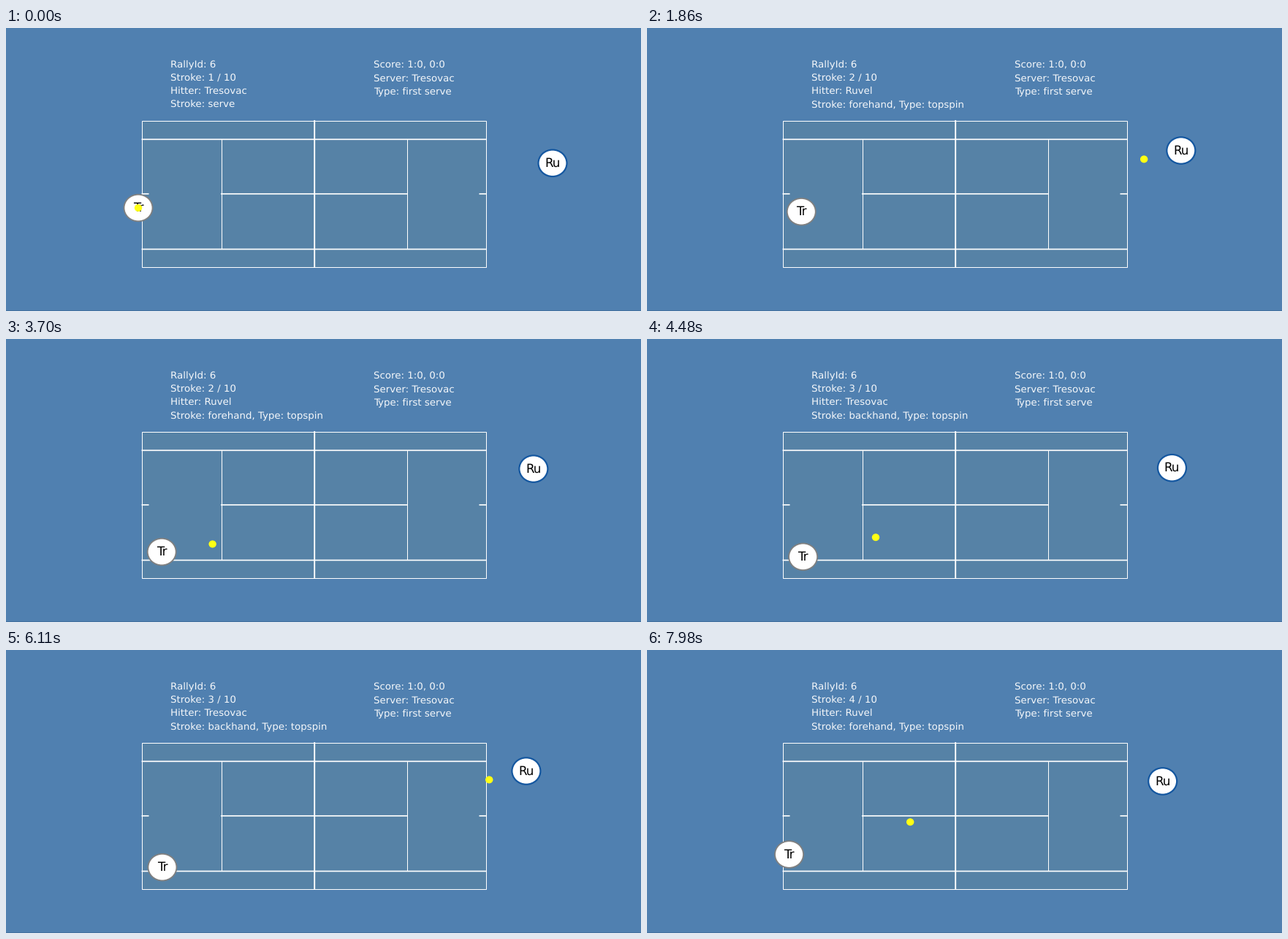
Write a matplotlib script that moves like this. It is 869 by 387 pixels and loops after 8000 ms.

```python
import matplotlib.pyplot as plt
import numpy as np
from matplotlib.animation import FuncAnimation
from matplotlib.patches import Ellipse, Rectangle

W, H, DPI = 869, 387, 80
FRAMES, INTERVAL = 100, 80

plt.rcParams["font.family"] = "DejaVu Sans"
plt.rcParams["text.hinting"] = "none"

SERVER, RECEIVER = "Tresovac", "Ruvel"

# Steps at which the ball is struck, and where each player stands then
HITS = [0, 20, 50, 80, 110]
SERVER_POS = np.array([(181, 246), (211, 246), (213.5, 298), (214, 297), (184.8, 270.8)])
RECEIVER_POS = np.array([(748, 184.8), (732, 166.2), (720.3, 179.3), (711, 164), (703, 187.2)])
BALL_POS = np.array([SERVER_POS[k] if k % 2 == 0 else RECEIVER_POS[k]
                     for k in range(len(HITS))])
SHOTS = ["serve", "forehand, Type: topspin", "backhand, Type: topspin",
         "forehand, Type: topspin"]

fig = plt.figure(figsize=(W / DPI, H / DPI), dpi=DPI, facecolor="#5080b0")
ax = fig.add_axes([0, 0, 1, 1])
ax.set_xlim(0, W)
ax.set_ylim(H, 0)
ax.axis("off")


def px(width):
    """Line width in points for a width in pixels."""
    return width * 72 / DPI


def line(xs, ys, width=1.7, color="white"):
    ax.plot(xs, ys, color=color, lw=px(width), solid_capstyle="butt",
            snap=False, zorder=2)


def box(x0, y0, x1, y1, fill="none"):
    """Court box whose one-pixel outline fills the given pixel rows."""
    ax.add_patch(Rectangle((x0 + 0.5, y0 + 0.5), x1 - x0, y1 - y0, facecolor=fill,
                           edgecolor="white", lw=px(1), snap=False, zorder=1))


def note(x, y, text=""):
    return ax.text(x, y, text, color="#f4f7fa", fontsize=12, va="baseline")


def player(label, edge, width):
    disc = Ellipse((0, 0), 39, 36.5, facecolor="white", edgecolor=edge,
                   lw=px(width), zorder=4)
    ax.add_patch(disc)
    text = ax.text(0, 0, label, fontsize=15, color="black", ha="center",
                   va="baseline", zorder=5)
    return disc, text


def draw_court():
    box(186, 127, 657, 327, "#5682a6")
    box(295, 152, 549, 302)
    for y in (152.3, 302.5):
        line([185.5, 658], [y, y])
    for x0, x1 in ((294, 549), (185.5, 195.5), (647.5, 658)):
        line([x0, x1], [226.8, 226.8])
    line([422.2, 422.2], [126, 328], 1.9)
    line([0, W], [H - 0.5, H - 0.5], 1, "#42709f")


draw_court()
note(225, 54, "RallyId: 6")
count_note = note(225, 73)
hitter_note = note(225, 91)
shot_note = note(225, 109)
note(503, 54, "Score: 1:0, 0:0")
note(503, 73, f"Server: {SERVER}")
note(503, 91, "Type: first serve")

server = player(SERVER[:2], "#808080", 1.8)
receiver = player(RECEIVER[:2], "#1457a0", 2.2)
ball = Ellipse((0, 0), 10.4, 10, facecolor="#ffff14", edgecolor="none", zorder=6)
ax.add_patch(ball)


def along(path, step):
    return [np.interp(step, HITS, path[:, axis]) for axis in (0, 1)]


def place(who, path, step):
    x, y = along(path, step)
    who[0].set_center((x, y))
    who[1].set_position((x, y + 5))


def update(i):
    step = i + (i >= 58)  # one step is dropped mid-rally
    shot = int(np.searchsorted(HITS, step, side="right")) - 1
    count_note.set_text(f"Stroke: {shot + 1} / 10")
    hitter_note.set_text(f"Hitter: {RECEIVER if shot % 2 else SERVER}")
    shot_note.set_text(f"Stroke: {SHOTS[shot]}")
    place(server, SERVER_POS, step)
    place(receiver, RECEIVER_POS, step)
    ball.set_center(along(BALL_POS, step))
    return []


anim = FuncAnimation(fig, update, frames=FRAMES, interval=INTERVAL,
                     repeat=True, repeat_delay=0)
plt.show()
```
